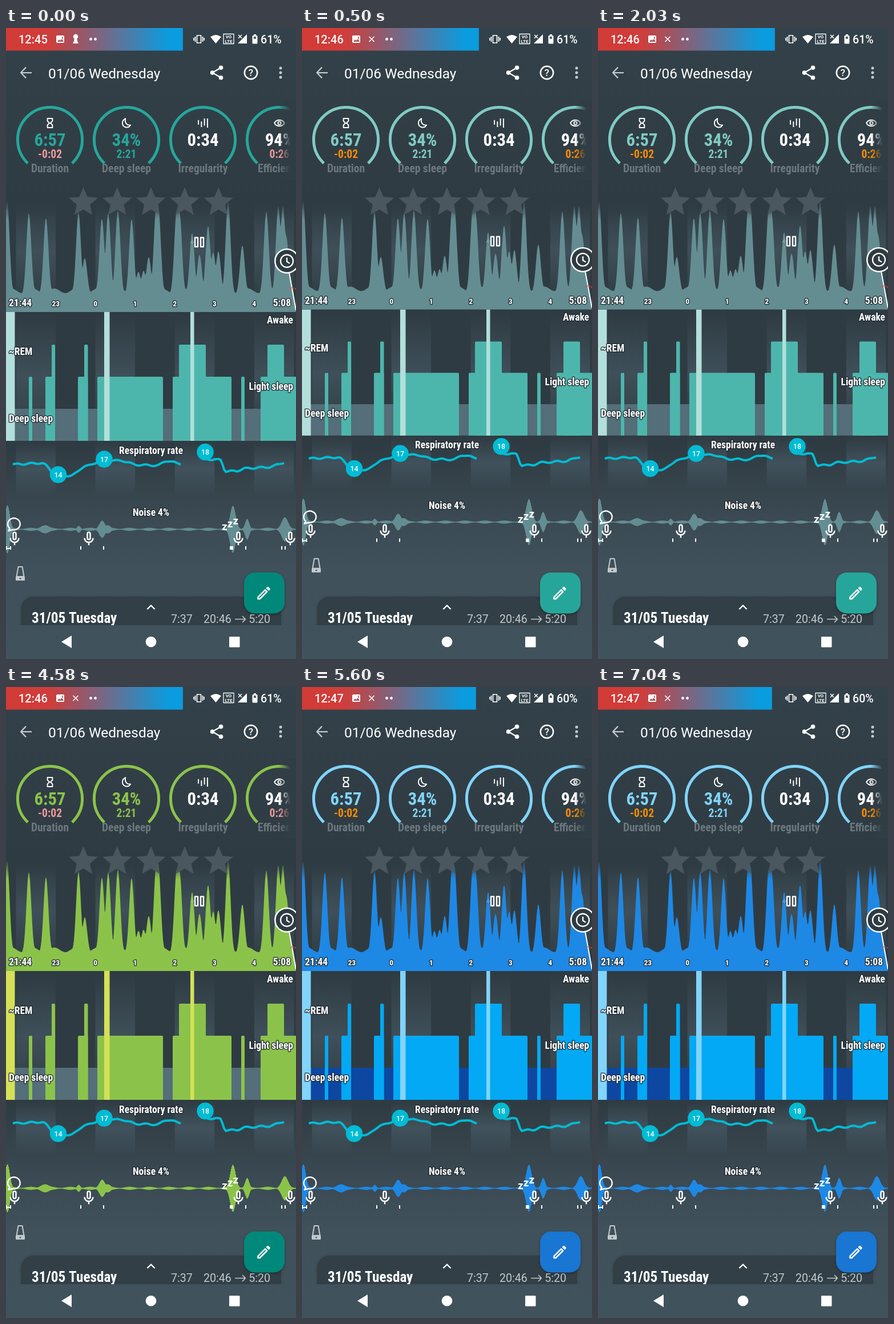
An HTML page with a canvas that plays this animation: 508x1102 px, repeating every 8 s.

```html
<!DOCTYPE html>
<html lang="en">
<head>
<meta charset="utf-8">
<title>Sleep report themes</title>
<style>
html, body { margin: 0; width: 100%; height: 100%; overflow: hidden; background: #2f3b42; }
canvas { display: block; width: 508px; height: 1102px; }
</style>
</head>
<body>
<canvas id="stage"></canvas>
<script>
const W = 508, H = 1102, LOOP = 8000;
const canvas = document.getElementById('stage');
const dpr = window.devicePixelRatio || 1;
canvas.width = W * dpr;
canvas.height = H * dpr;
const c = canvas.getContext('2d');

const teal = { start: 0, clock: '12:45', charge: 61, main: '#26a69a', sub: '#ef9a9a', wave: '#648d92',
  deep: '#546e7a', light: '#4db6ac', awake: '#b2dfdb', fab: '#00897b', squash: 1 };
const themes = [
  teal,
  { ...teal, start: 500, clock: '12:46', main: '#80cbc4', sub: '#fb8c00', fab: '#26a69a', squash: .978 },
  { ...teal, start: 3050, clock: '12:46', main: '#8bc34a', wave: '#8bc34a', light: '#8bc34a', awake: '#d4e157' },
  { ...teal, start: 5600, clock: '12:47', charge: 60, main: '#81d4fa', sub: '#fb8c00', wave: '#1e88e5',
    deep: '#0d47a1', light: '#03a9f4', awake: '#81d4fa', fab: '#1976d2' }
];

const DARK = '#2f3b42', CYAN = '#00bcd4', SOFT = '#c3cacd';
const ICON = {
  star: 'M12 17.27L18.18 21l-1.64-7.03L22 9.24l-7.19-.61L12 2 9.19 8.63 2 9.24l5.46 4.73L5.82 21z',
  back: 'M20 12H5M12 4.5L4.8 12l7.2 7.5',
  share: 'M18 5L6 12l12 7',
  hourglass: 'M7 3h10v5l-4 4 4 4v5H7v-5l4-4-4-4z',
  moon: 'M10 3c-4 2-6 5-6 9a8.5 8.5 0 0 0 16 4C13 17 8 12 10 3z',
  bars: 'M3 6v9M9 9v11M15 3v14M21 3v18',
  eye: 'M2 12c4-8 16-8 20 0-4 8-16 8-20 0zM9 12a3 3 0 0 0 6 0 3 3 0 0 0-6 0',
  mic: 'M12 3a2 2 0 0 1 2 2v6a2 2 0 0 1-4 0V5a2 2 0 0 1 2-2M6 11a6 6 0 0 0 12 0M12 17v4',
  bubble: 'M5 18.5A9 8.5 0 1 1 9 20.5L3 22z',
  edit: 'M4 20v-2.5L14 7.5l2.5 2.5L6.5 20zM16.5 5l1.3-1 2.2 2.2-1 1.3z'
};

// Peaks as [x, height].
const movement = [[2, 163], [40, 143], [70, 134], [127, 144], [138, 64], [168, 133], [179, 143], [196, 148],
  [220, 132], [232, 40], [241, 42], [250, 66], [263, 150], [267, 150], [299, 145], [304, 143], [326, 108],
  [339, 70], [354, 120], [363, 74], [372, 76], [389, 165], [414, 86], [456, 146], [477, 155], [485, 155], [491, 100]];
// Bursts as [x, height, width].
const noise = [[2, 42, 6], [68, 7, 11], [127, 6, 4], [168, 15, 7], [178, 7, 7], [397, 41, 7], [422, 18, 5], [488, 21, 8]];
const breathing = [
  [[12, 762], [62, 760], [91, 781], [113, 782], [140, 765], [172, 754], [203, 756], [230, 763], [265, 764], [282, 756], [306, 761]],
  [[349, 753], [375, 754], [385, 774], [401, 774], [420, 769], [460, 767], [488, 759]]
];

let squash = 1;
const Y = y => 300 + (y - 300) * squash;

// Height at x of overlapping bell curves; the highest one dominates.
function bells(list, x, floor) {
  const sum = list.reduce((s, [at, h, w = 6]) => s + (h * Math.exp(-(((x - at) / w) ** 2))) ** 4, floor ** 4);
  return sum ** .25;
}
function glide(points, x) {
  const i = Math.max(1, points.findIndex(p => p[0] >= x));
  const [[x0, y0], [x1, y1]] = [points[i - 1], points[i]];
  const u = (x - x0) / (x1 - x0);
  return y0 + (y1 - y0) * u * u * (3 - 2 * u);
}

function fill(color, path) { c.fillStyle = color; path ? c.fill(path) : c.fill(); }
function rect(x, y, w, h, color, r = 0) { c.beginPath(); c.roundRect(x, y, w, h, r); fill(color); }
function dot(x, y, r, color = '#fff') { c.beginPath(); c.arc(x, y, r, 0, 7); fill(color); }
function ring(x, y, r, color, width, from = 0, to = 7) {
  c.beginPath();
  c.arc(x, y, r, from, to);
  c.strokeStyle = color;
  c.lineWidth = width;
  c.stroke();
}
function stroke(path, color = '#fff', width = 2) {
  c.strokeStyle = color;
  c.lineWidth = width;
  c.stroke(new Path2D(path));
}
function icon(name, x, y, scale, color = '#fff', line = 2) {
  c.save();
  c.translate(x, y);
  c.scale(scale, scale);
  c.translate(-12, -12);
  line ? stroke(ICON[name], color, line) : fill(color, new Path2D(ICON[name]));
  c.restore();
}
function gradient(x0, y0, x1, y1, stops) {
  const g = c.createLinearGradient(x0, y0, x1, y1);
  stops.forEach(([at, color]) => g.addColorStop(at, color));
  return g;
}
function text(s, x, y, size, { color = '#fff', align = 'left', weight = 400, narrow = false, edge = false } = {}) {
  c.font = narrow ? `${weight} condensed ${size}px "Roboto Condensed", Roboto, sans-serif`
                  : `${weight} ${size}px Roboto, sans-serif`;
  c.textAlign = align;
  if (edge) {
    c.strokeStyle = 'rgba(35,45,50,.85)';
    c.lineWidth = 3;
    c.strokeText(s, x, y);
  }
  c.fillStyle = color;
  c.fillText(s, x, y);
}
const label = (s, x, y, align, size = 17.5) =>
  text(s, x, Y(y), size, { align, weight: 700, narrow: true, edge: true });

function statusBar(t) {
  const w = W * t.charge / 100;
  rect(0, 0, w, 39.5, gradient(0, 0, w, 0, [[0, '#d23b36'], [.24, '#d03d3a'], [.92, '#0a9cdf'], [1, '#0a9cdf']]));
  text(t.clock, 22, 27, 20, { weight: 500 });
  rect(88, 13, 14, 13, '#fff', 2);
  fill('#b8504f', new Path2D('M90 24l3-4 2 2 3-3 3 5zM98 15h1.5v4H98z'));
  if (t.start) stroke('M117.5 15l9 9M126.5 15l-9 9', '#fff', 1.6);
  else {
    dot(122, 15, 4.3);
    fill('#fff', new Path2D('M120 17h4l1 6 2 4h-10l2-4z'));
  }
  dot(148.5, 19.5, 2.4);
  dot(156.5, 19.5, 2.4);
  stroke('M334.5 13h7v13h-7zM331.5 15v9M344.5 15v9M329 17v5M347 17v5', '#fff', 1.7);
  fill('#fff', new Path2D('M358 15.5q9.5-7 19 0L367.5 27z'));
  stroke('M381 10.5h18v17h-18z', '#fff', 1.3);
  ['VO', 'LTE'].forEach((s, i) => text(s, 390, 18.2 + i * 7.8, 8, { weight: 700, align: 'center' }));
  fill('#fff', new Path2D('M406 27L422 11v16z'));
  stroke('M407 12l6 6M413 12l-6 6', '#fff', 1.5);
  rect(431.5, 13, 9, 14.5, '#fff', 1.5);
  rect(434, 11, 4, 3, '#fff');
  rect(434, 15, 4, 4, '#596469');
  text(t.charge + '%', 446, 27, 19.6, { weight: 500 });
}

function appBar() {
  icon('back', 35, 78, 1.25, SOFT, 1.8);
  text('01/06 Wednesday', 74, 87.5, 24.4);
  icon('share', 369, 78, 1.26, '#fff', 1.9);
  [[376.5, 69.2], [361.5, 78], [376.5, 86.8]].forEach(([x, y]) => dot(x, y, 3.8));
  ring(429, 78, 11.2, '#fff', 2.5);
  text('?', 429, 84, 17, { weight: 500, align: 'center' });
  [70, 78, 86].forEach(y => dot(481, y, 2.5, SOFT));
}

function gauges(t) {
  const items = [
    ['hourglass', '6:57', '-0:02', 'Duration', t.main, t.sub],
    ['moon', '34%', '2:21', 'Deep sleep', t.main, t.main],
    ['bars', '0:34', '', 'Irregularity', '#fff', ''],
    ['eye', '94%', '0:26', 'Efficiency', '#fff', t.sub]
  ];
  items.forEach(([name, value, change, title, color, subColor], i) => {
    const x = 77 + i * 134, opt = { align: 'center', narrow: true };
    ring(x, 195, 56.6, t.main, 5, Math.PI * .74, Math.PI * 2.26);
    icon(name, x, 166, .88, '#fff', 2.2);
    text(value, x, 206, 30.7, { ...opt, color, weight: 700 });
    text(change, x, 227, 19.5, { ...opt, color: subColor, weight: 600 });
    text(title, x, 252, 19.5, { ...opt, color: '#6c787e', weight: 600 });
  });
  rect(478, 125, 30, 140, gradient(478, 0, 498, 0, [[0, 'rgba(48,61,68,0)'], [1, '#303d44']]));
}

function columns(top, bottom) {
  const clear = 'rgba(84,108,122,0)';
  const glow = gradient(0, Y(top), 0, Y(bottom), [[0, clear], [.5, 'rgba(84,108,122,.42)'], [1, clear]]);
  for (let x = 17.5; x < W; x += 139.1) rect(x, Y(top), 69.5, Y(bottom) - Y(top), glow);
}

function movementChart(t) {
  columns(300, 480);
  const y = Y(407);
  c.save();
  // Tracking ends at the slanted line under the clock.
  c.clip(new Path2D(`M0 0H496V${y + 20}L508 ${Y(496)}H0z`));
  c.beginPath();
  c.moveTo(0, Y(496));
  for (let x = 0; x <= W; x++) c.lineTo(x, Y(466 - bells(movement, x, 7 + 4 * Math.sin(x / 6))));
  c.lineTo(W, Y(496));
  fill(t.wave);
  c.restore();
  rect(0, 290, W, 45, gradient(0, 298, 0, 335, [[0, DARK], [1, 'rgba(47,59,66,0)']]));
  for (let i = 0; i < 5; i++) icon('star', 135.5 + i * 59.2, 303.5, 2.55, 'rgba(77,90,97,.92)', 0);

  const p = Y(374);
  stroke(`M331 ${p - 8}h5v16h-5zM341 ${p - 8}h5v16h-5z`, '#fff', 2.4);
  stroke(`M323 ${p + 2}l4-5M326 ${p + 3}l3-4`, '#a9c0c3', 1);
  stroke(`M496 ${y + 20}L508 ${Y(493)}`, '#fff', 2);
  for (let x = 498; x < W; x += 4) stroke(`M${x} ${Y(457)}l3-4`, '#d04744', 1.2);
  dot(492, y, 22);
  dot(492, y, 19.5, DARK);
  ring(492, y, 11, '#fff', 2.3);
  stroke(`M492 ${y - 6}v7l5 3`, '#fff', 2.3);

  label('21:44', 5, 486, 'left', 17.5);
  label('5:08', 499, 486, 'right', 17.5);
  ['23', '0', '1', '2', '3', '4'].forEach((h, i) => label(h, 87.3 + i * 69.5, 486, 'center', 13.7));
}

function stages(t) {
  columns(500, 721);
  const bars = (color, top, spans) => spans.forEach(([a, b]) =>
    rect(a, Y(top), b - a, Y(721) - Y(top), color, top > 500 ? [2, 2, 0, 0] : 0));
  bars(t.deep, 665, [[0, W]]);
  bars(t.light, 609, [[40, 46], [69, 86], [126, 143.5], [160, 275], [292, 395], [412, 418], [446, 510]]);
  bars(t.light, 553, [[80, 86], [137, 143.5], [303, 350], [458, 487]]);
  bars(t.awake, 496, [[0, 15.5], [172, 181.5], [323, 329.5]]);
  label('Awake', 503, 516, 'right');
  label('~REM', 5, 571, 'left');
  label('Light sleep', 503, 631.5, 'right');
  label('Deep sleep', 5, 687.5, 'left');
}

function respiration() {
  columns(722, 818);
  c.strokeStyle = CYAN;
  c.lineWidth = 4;
  for (const run of breathing) {
    c.beginPath();
    for (let x = run[0][0]; x <= run.at(-1)[0]; x += 3) c.lineTo(x, Y(glide(run, x) + 1.3 * Math.sin(x / 4)));
    c.stroke();
  }
  [[91.5, 780, '14'], [172, 753, '17'], [349, 740.5, '18']].forEach(([x, y, n]) => {
    dot(x, Y(y), 14.7, CYAN);
    text(n, x, Y(y) + 4.5, 12.5, { align: 'center', weight: 500 });
  });
  label('Respiratory rate', 254, 744, 'center');
}

function noiseChart(t) {
  for (let x = 0; x < W; x++) {
    const h = bells(noise, x, 1.7 + Math.sin(x / 5.5)) * squash;
    rect(x, Y(875.5) - h, 1, 2 * h, t.wave);
  }
  label('Noise 4%', 254, 852, 'center');
  icon('bubble', 15, Y(866), 1.2);
  [15, 145, 407, 498].forEach(x => icon('mic', x, Y(892), 1.25));
  [0, 7, 130, 170, 419, 482, 488].forEach(x => rect(x, Y(911) - 6, 2, 6, '#fff'));
  rect(0, Y(911) - 3, 9, 2, '#fff');
  rect(392, Y(911) - 6, 6, 6, '#fff');
  for (let i = 0; i < 3; i++) text('z', 378 + i * 9.7, Y(877 - i * 5), 19, { weight: 700 });
  const y = Y(952);
  stroke(`M21.5 ${y - 11}h7l3 17h-13z`, SOFT, 2);
  rect(17, y + 6, 16, 7, SOFT, 1);
  rect(23.5, y + 8.5, 3, 2, '#40515b');
}

function bottom(t) {
  c.save();
  c.beginPath();
  c.rect(0, 980, W, 63);
  c.clip();
  c.shadowColor = 'rgba(0,0,0,.15)';
  c.shadowBlur = 5;
  rect(26, 993, 456, 80, '#323f46', 22);
  c.shadowBlur = 0;
  stroke('M247.5 1015l6.5-6.5 6.5 6.5', '#fff', 2.4);
  text('31/05 Tuesday', 45, 1039, 25.2, { weight: 600, narrow: true });
  text('7:37', 289, 1039, 19.6, { color: SOFT });
  text('20:46', 346, 1039, 19.6, { color: SOFT });
  text('5:20', 463, 1039, 19.6, { color: SOFT, align: 'right' });
  stroke('M401 1032.5h18M414 1027l5.5 5.5-5.5 5.5', SOFT, 1.6);
  c.restore();

  c.save();
  c.shadowColor = 'rgba(0,0,0,.3)';
  c.shadowBlur = 5;
  c.shadowOffsetY = 2;
  rect(417, 951, 71, 71.5, t.fab, 19);
  c.restore();
  icon('edit', 451.5, 987, 1.25);
  fill('#fff', new Path2D('M97 1072l18-11v22z'));
  dot(254, 1072, 9.3);
  rect(391, 1063, 18.5, 18.5, '#fff', 1);
}

function draw(t) {
  squash = t.squash;
  c.setTransform(dpr, 0, 0, dpr, 0, 0);
  c.lineJoin = 'round';
  rect(0, 0, W, H, gradient(0, 0, 0, H,
    [[0, '#33414a'], [.27, DARK], [.66, DARK], [.78, '#3b4a53'], [.86, '#40515b'], [1, '#40525c']]));
  statusBar(t);
  appBar();
  gauges(t);
  movementChart(t);
  stages(t);
  respiration();
  noiseChart(t);
  bottom(t);
}

let shown;
function tick(now) {
  const time = now % LOOP;
  const theme = themes.findLast(t => time >= t.start);
  if (theme !== shown) draw(shown = theme);
  requestAnimationFrame(tick);
}
tick(performance.now());
</script>
</body>
</html>
```
